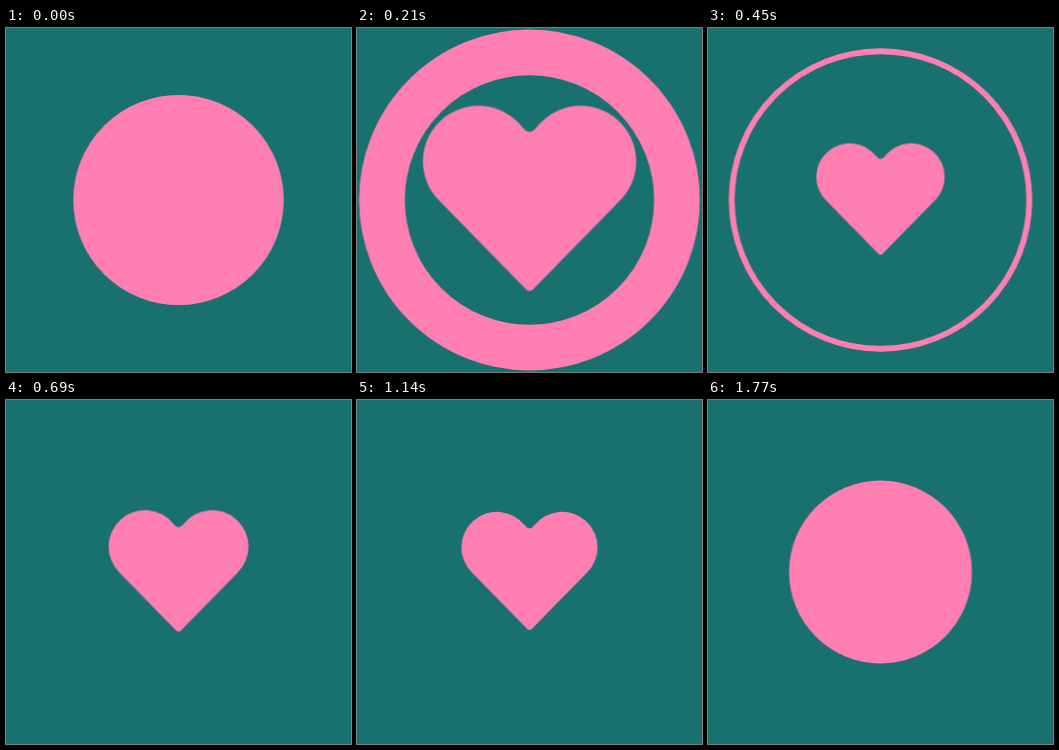
Animation of 345x344 px, one loop 1800 ms. Source, as an HTML page:

```html
<!DOCTYPE html>
<html lang="en">
<head>
<meta charset="utf-8">
<title>Heart pop</title>
<style>
  :root { --teal: #18706f; --pink: #ff7fb2; }
  html, body { margin: 0; width: 100%; height: 100%; overflow: hidden; background: var(--teal); }
  svg { display: block; width: 345px; height: 344px; }

  .heart, .disc, .ring {
    animation-duration: 1800ms;
    animation-iteration-count: infinite;
    animation-timing-function: linear;
  }
  .heart, .disc { fill: var(--pink); }
  .heart { animation-name: beat; }
  .disc { animation-name: swell; }
  .ring {
    fill: none;
    stroke: var(--pink);
    animation-name: widen, thin, blink;
  }

  /* Springs out of the ring, then settles */
  @keyframes beat {
    0%, 1.667% { transform: scale(0); animation-timing-function: cubic-bezier(.3, .5, .6, 1); }
    11.667% { transform: scale(1.566); animation-timing-function: cubic-bezier(.4, 0, .3, 1); }
    25% { transform: scale(.943); animation-timing-function: cubic-bezier(.4, 0, .5, 1); }
    38.333% { transform: scale(1.027); animation-timing-function: ease-in-out; }
    51.667% { transform: scale(.993); animation-timing-function: ease-in-out; }
    63.333%, 96.666% { transform: scale(1); }
    96.667%, 100% { transform: scale(0); }
  }

  /* Grows behind the heart until it covers it */
  @keyframes swell {
    0%, .6% { r: 104.5px; }
    .601%, 88.888% { r: 0; }
    88.889% { r: 29px; }
    91.667% { r: 45.5px; }
    98.333% { r: 91px; }
    100% { r: 104.5px; }
  }

  @keyframes widen {
    0% { r: 48.5px; animation-timing-function: cubic-bezier(.333, .667, .667, 1); }
    13.889% { r: 150px; }
    25% { r: 148.8px; }
    32.5%, 100% { r: 150px; }
  }
  @keyframes thin {
    0% { stroke-width: 112px; animation-timing-function: cubic-bezier(.333, .667, .667, 1); }
    32.5%, 100% { stroke-width: 0; }
  }
  @keyframes blink {
    0%, 30.833% { opacity: 1; }
    30.834%, 100% { opacity: 0; }
  }
</style>
</head>
<body>
<svg viewBox="0 0 345 344">
  <g transform="translate(172.5 172)">
    <circle class="ring" r="48.5"/>
    <circle class="disc" r="104.5"/>
    <path class="heart" d="M-2.5 56.8 L-57.6 .5 A35.5 35.5 0 1 1 -4.5 -46.4
      Q0 -40.6 4.5 -46.4 A35.5 35.5 0 1 1 57.6 .5 L2.5 56.8 Q0 59.3 -2.5 56.8 Z"/>
  </g>
</svg>
</body>
</html>
```
